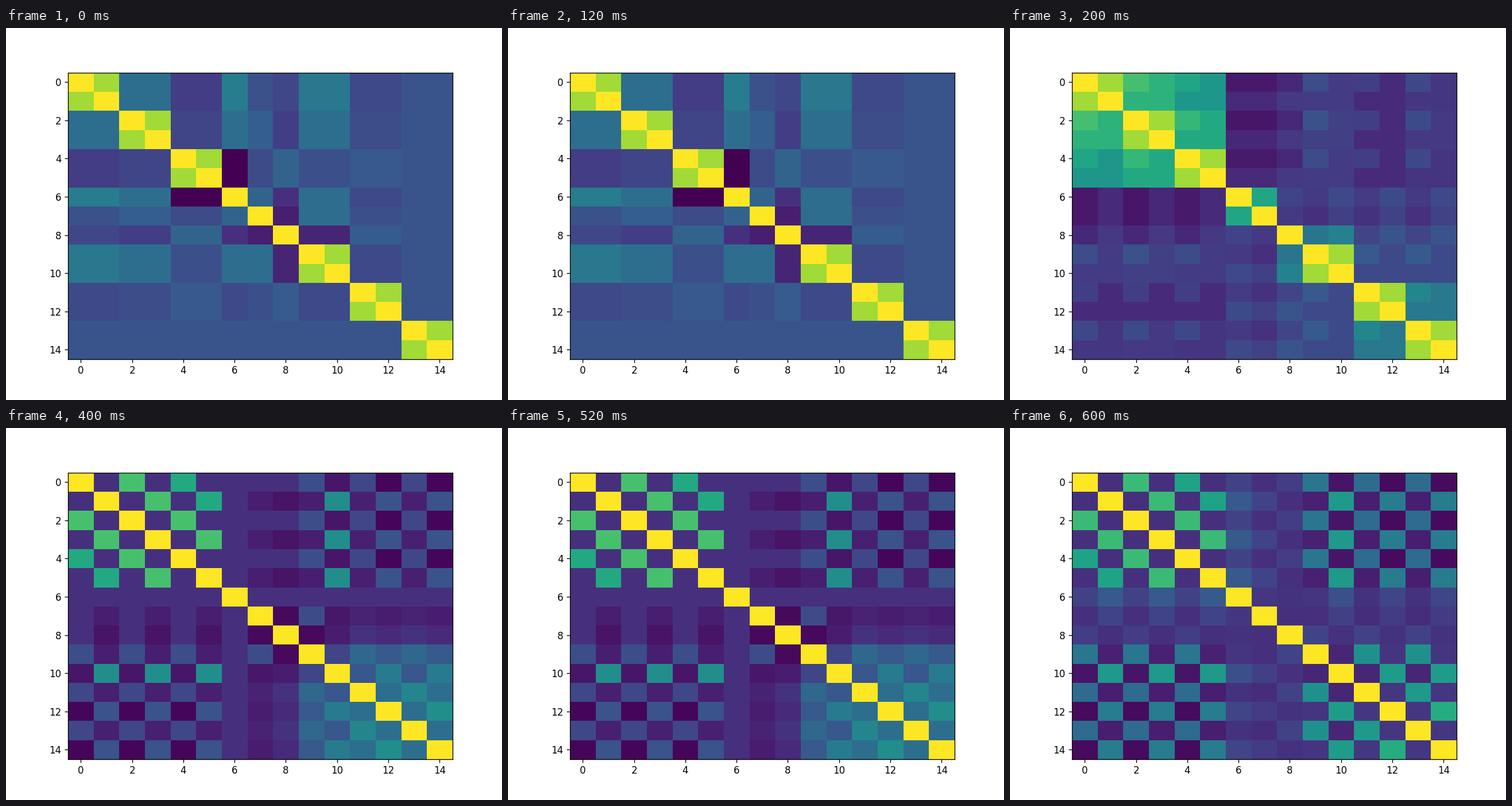
Recreate the animation shown at these times as a matplotlib script. Size 864 by 648 pixels, loop 800 ms.

```python
import numpy as np
import matplotlib.pyplot as plt
from matplotlib.animation import FuncAnimation

SIZE = 15
index = np.arange(SIZE)
middle = (index >= 6) & (index <= 8)
gap = np.abs(index[:, None] - index)

# Each variable is labelled with the first member of its group.
twins = np.where(middle, index, index - (index + (index > 8)) % 2)
strands = np.where(index < 6, index % 2, np.where(index > 12, index - 2, index))


def factor_model(leaders, base, factors):
    """Correlation in percent: a base level plus one outer product per factor."""
    matrix = np.full((SIZE, SIZE), float(base))
    for factor in factors:
        loads = [factor.get(leader, 0) for leader in leaders]
        matrix += np.outer(loads, loads)
    return matrix


def finish(matrix):
    np.fill_diagonal(matrix, 100)
    return matrix.clip(0, 100)


def twin_step(base, factors, lean=0):
    """Neighbours form tight pairs; lean favours the first member of each."""
    matrix = factor_model(twins, base, factors)
    side = np.where(middle, 0, np.where(index == twins, 1, -1))
    a, b = np.meshgrid(side, side)
    matrix += lean * np.where(a * b != 0, a + b + a * b, -1.7 * (a + b))
    return finish(np.where(twins[:, None] == twins, 86, matrix))


def strand_step(base, factors):
    """Alternating variables form strands whose correlation fades with distance."""
    matrix = factor_model(strands, base, factors)
    same = strands[:, None] == strands
    return finish(matrix + np.where(same, 5 * (3 - gap), 0))


steps = [
    twin_step(26, [
        {0: 4, 2: 2.5, 4: -2, 6: 4, 7: 1.5, 8: -3, 9: 4, 11: -1},
        {4: -4.2, 6: 4.2, 9: -1.5},
        {0: -2, 7: 3.6, 8: -3.6, 9: 1},
    ]),
    twin_step(14, [
        {0: 6.6, 2: 7.9, 4: 6.1, 6: -0.7, 7: -0.7, 9: 0.8, 13: 0.5},
        {6: 6.6, 7: 6.6},
        {6: 1.4, 7: 0.7, 8: 4.3, 9: 4.3, 11: 4.3, 13: 4.3},
        {8: 3, 9: 3, 11: -3, 13: -3},
    ], lean=1.5),
    strand_step(14, [
        {0: 7.2, 9: 1.4, 10: -1.1, 11: 1, 12: -1.7},
        {1: 7.2, 7: -0.8, 8: -1.2, 9: -0.8, 10: 4.9, 11: -0.7, 12: 1.6},
        {7: -1, 9: 3.5, 10: 3.5, 11: 5, 12: 5},
        {7: 3.5, 8: -3.5, 9: 3.5},
    ]),
    strand_step(14, [
        {0: 7, 6: 0.8, 8: 0.6, 9: 3.6, 10: -1.2, 11: 3, 12: -1.6},
        {1: 7, 6: 2, 7: 0.9, 9: -0.7, 10: 5.7, 11: -0.8, 12: 4},
        {8: 0.8, 9: 5, 10: 1, 11: 5, 12: 2},
        {10: 3.2, 12: 4.5},
    ]),
]

fig, ax = plt.subplots(figsize=(7.2, 5.4), dpi=120)
image = ax.imshow(steps[0], cmap="viridis", vmin=0, vmax=100,
                  aspect="auto", interpolation="nearest")
ax.set_xticks(range(0, SIZE, 2))
ax.set_yticks(range(0, SIZE, 2))


def update(frame):
    image.set_data(steps[frame])
    return [image]


animation = FuncAnimation(fig, update, frames=len(steps), interval=200,
                          repeat=True, repeat_delay=0)
plt.show()
```
